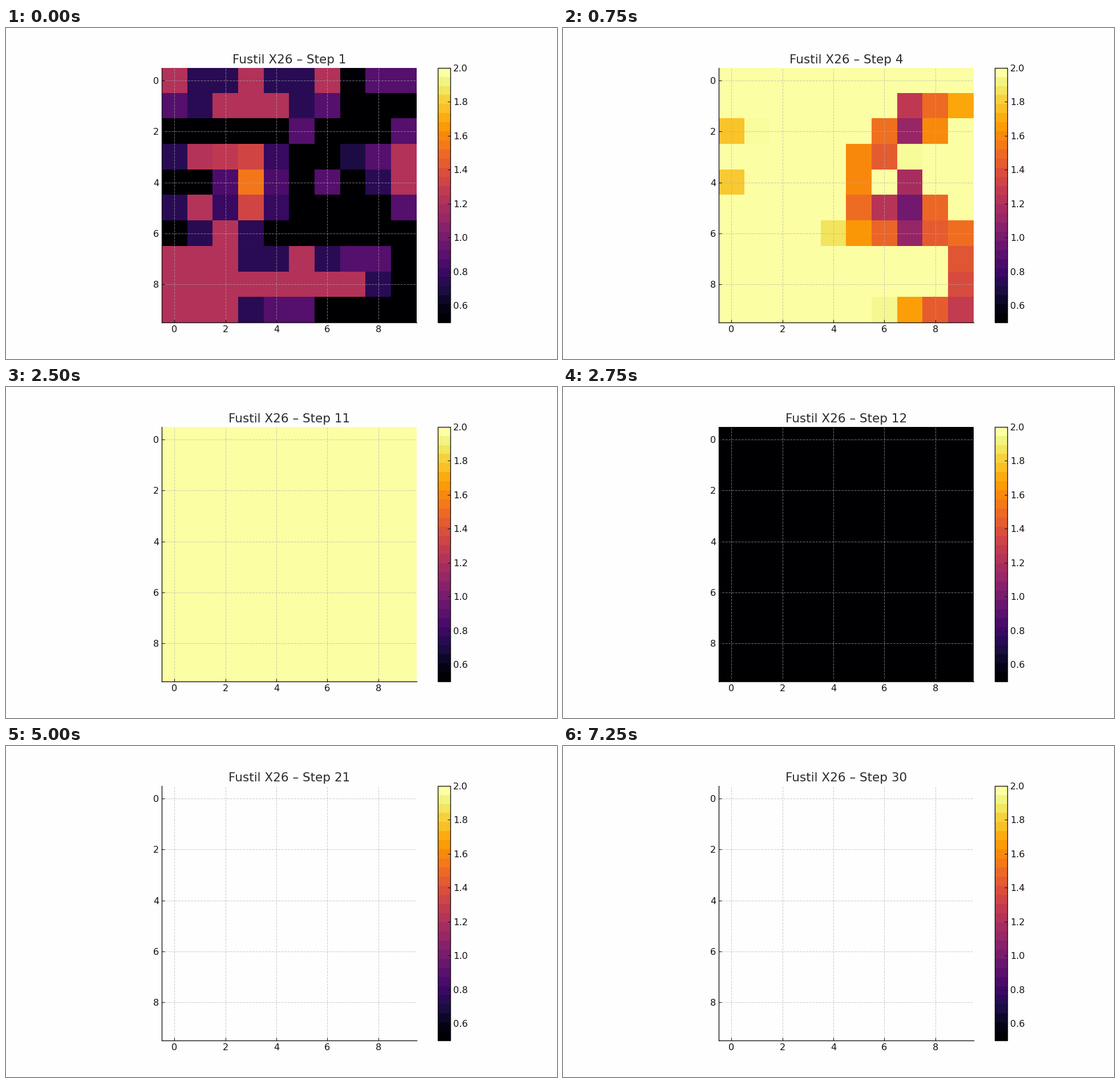
These frames come from a looping animation (966 by 580 pixels, 7500 ms). A matplotlib script:

```python
import numpy as np
import matplotlib.pyplot as plt
from matplotlib.animation import FuncAnimation
from matplotlib.cm import ScalarMappable
from matplotlib.colors import Normalize

DPI = 96
SIZE = 10
STEPS = 30
LOW, HIGH = 0.5, 2.0
PAPER, INK = "#fefefe", "#111111"

plt.rcParams.update({
    "font.family": "DejaVu Sans",
    "font.size": 12.07,
    "axes.linewidth": 1.0,
    "axes.edgecolor": INK,
    "axes.facecolor": PAPER,
    "xtick.direction": "in",
    "ytick.direction": "in",
    "xtick.color": INK,
    "ytick.color": INK,
})

# Horizontal strokes of energy: (row, first column, last column)
HOT = [(0, 0, 0), (0, 3, 3), (0, 6, 6), (1, 2, 4), (3, 1, 3),
       (3, 9, 9), (4, 3, 3), (4, 9, 9), (5, 1, 1), (5, 3, 3),
       (6, 2, 2), (7, 0, 2), (7, 5, 5), (8, 0, 7), (9, 0, 2)]
WARM = [(0, 8, 9), (1, 0, 0), (1, 6, 6), (2, 5, 5), (2, 9, 9),
        (3, 7, 8), (4, 6, 6), (5, 9, 9), (7, 7, 8), (9, 4, 5)]


def seed_field():
    """Strokes that fade with distance, a bright core and a quiet channel."""
    rows, cols = np.mgrid[:SIZE, :SIZE]
    energy = np.full((SIZE, SIZE), 0.35)
    for level, strokes in ((1.22, HOT), (0.87, WARM)):
        for row, first, last in strokes:
            aside = np.maximum(0, np.maximum(first - cols, cols - last))
            fade = 0.5 * np.hypot(aside, 1.7 * (rows - row))
            energy = np.maximum(energy, level - fade)
    energy += 0.33 * np.exp(-((rows - 4) ** 2 + (cols - 3) ** 2))
    energy[:7, 7] -= 0.2
    return energy


def grow(energy):
    """Each cell amplifies itself and feeds on its eight neighbours."""
    padded = np.pad(energy, 1, mode="edge")
    block = sum(padded[r:r + SIZE, c:c + SIZE] for r in range(3) for c in range(3))
    return 1.2 * energy + 0.3 * (block - energy) / 8


def field(step):
    """Growth saturates, drops to the bottom of the scale, then is invalid."""
    if step >= 12:
        return np.full((SIZE, SIZE), LOW if step == 12 else np.nan)
    energy = seed_field()
    for _ in range(step - 1):
        energy = grow(energy)
    return np.clip(energy, LOW, HIGH)


fig, ax = plt.subplots(figsize=(966 / DPI, 580 / DPI), dpi=DPI, facecolor=PAPER)
norm = Normalize(LOW, HIGH)
image = ax.imshow(field(1), cmap="inferno", norm=norm, interpolation="nearest")
fig.colorbar(ScalarMappable(norm, plt.get_cmap("inferno", 28)), ax=ax)
ax.grid(color="#b0b0b0", linestyle="--", linewidth=0.8, alpha=0.6)
ax.spines[["top", "right"]].set_visible(False)
title = ax.set_title("", fontsize=16.1, color="#2b2b2b")


def draw(index):
    step = index + 1
    image.set_data(field(step))
    title.set_text(f"Fustil X26 – Step {step}")
    return image, title


anim = FuncAnimation(fig, draw, frames=STEPS, interval=250, repeat=True, blit=False)
plt.show()
```
